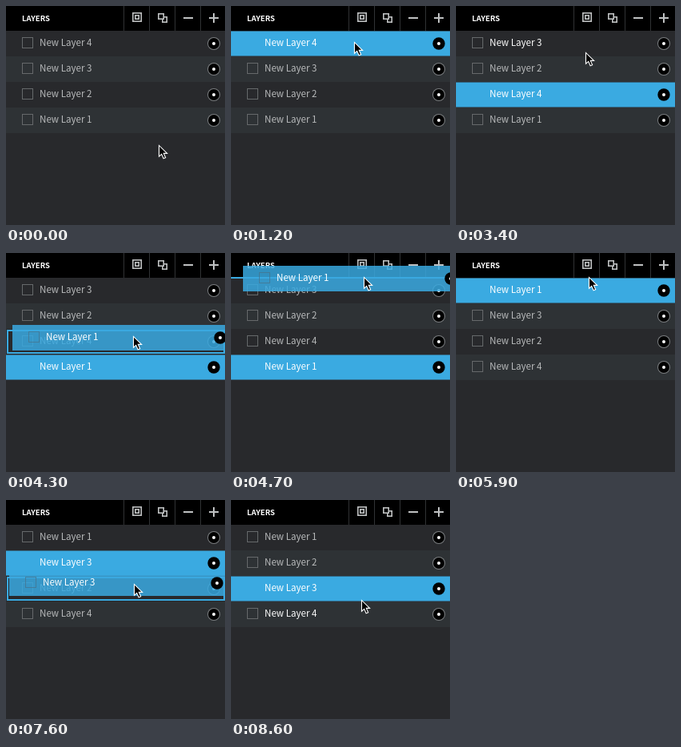
Animation, 274 px wide and 274 px high, one loop 9.2 s. Source, as an HTML page with a canvas:

```html
<!DOCTYPE html>
<html lang="en">
<head>
<meta charset="utf-8">
<title>Layer list reordering</title>
<style>
html, body { margin: 0; width: 274px; height: 274px; overflow: hidden; background: #28292c; }
canvas { display: block; }
</style>
</head>
<body>
<canvas id="stage" width="274" height="274"></canvas>
<script>
const LOOP = 9200, STEP = 100, SIZE = 274, TOP = 31, ROW = 32;
const BLUE = '#3aaae1', DARK = '#28292c', LIGHT = '#2e3235', GREY = '#bfc1c2';
const FONT = '"Noto Sans CJK JP", "Noto Sans CJK SC", "Noto Sans CJK", "Open Sans", sans-serif';
const ctx = document.getElementById('stage').getContext('2d');

// Pointer glides; bow bends the way up or down
const home = { x: 191, y: 174 };
const glides = [
  { from: 0, to: 600, x: 154, y: 45, bow: -25 },
  { from: 1200, to: 2100, x: 181, y: 122, bow: 15 },
  { from: 3000, to: 4000, x: 151, y: 141, bow: -75 },
  { from: 4100, to: 4700, x: 166, y: 30, bow: 0 },
  { from: 6400, to: 7000, x: 156, y: 80, bow: 0 },
  { from: 7300, to: 8200, x: 163, y: 125, bow: 12 }
];

// On drop the layer moves to the slot
const drags = [
  { press: 1200, drop: 2500, layer: '4', slot: 2 },
  { press: 4100, drop: 5800, layer: '1', slot: 0 },
  { press: 7300, drop: 8400, layer: '3', slot: 2 }
];

function pointerAt(t) {
  let { x, y } = home;
  for (const g of glides) {
    if (t <= g.from) break;
    const k = Math.min(1, (t - g.from) / (g.to - g.from));
    x += (g.x - x) * k * (2 - k);
    y += (g.y - y) * k + g.bow * Math.sin(Math.PI * k);
  }
  return { x: Math.round(x), y: Math.round(y) };
}

function orderAt(t) {
  let order = ['4', '3', '2', '1'];
  for (const d of drags) {
    if (t < d.drop) break;
    order = order.filter(layer => layer !== d.layer);
    order.splice(d.slot, 0, d.layer);
  }
  return order;
}

function rect(x, y, w, h, color) {
  ctx.fillStyle = color;
  ctx.fillRect(x, y, w, h);
}

function frame(x, y, w, h, color, line = 1) {
  ctx.strokeStyle = color;
  ctx.lineWidth = line;
  ctx.strokeRect(x + line / 2, y + line / 2, w - line, h - line);
}

function text(str, x, y, font, color) {
  ctx.font = font + ' ' + FONT;
  ctx.fillStyle = color;
  ctx.fillText(str, x, y);
}

function disc(x, y, r, color) {
  ctx.fillStyle = color;
  ctx.beginPath();
  ctx.arc(x, y, r, 0, Math.PI * 2);
  ctx.fill();
}

function eye(x, y, ringed) {
  if (ringed) disc(x, y, 8, '#7b7e80');
  disc(x, y, ringed ? 7 : 7.7, '#000');
  disc(x, y, 2, '#fff');
}

function label(layer, x, y, color) {
  text('New Layer ' + layer, x + 42, y + 19, '300 11.6px', color);
}

function row(layer, index, selected, hovered) {
  const y = TOP + index * ROW;
  rect(0, y, SIZE, ROW, index % 2 ? LIGHT : DARK);
  if (selected) rect(0, y + 0.5, SIZE, ROW - 1, BLUE);
  else frame(20, y + 8, 14, 14, '#66696b');
  label(layer, 0, y, selected || hovered ? '#fff' : '#b9bbbc');
  eye(260, y + 16, !selected);
}

function header() {
  rect(0, 0, SIZE, TOP, '#000');
  text('LAYERS', 20, 19, '700 9.5px', '#fff');
  for (let x = 147; x < SIZE; x += ROW) rect(x, 0, 1, TOP, '#303234');
  frame(158, 8, 12, 12, GREY, 1.6);
  frame(161, 11, 6, 6, GREY, 1.6);
  frame(195, 13, 7, 8, GREY, 1.6);
  rect(190, 9, 8, 8, '#000');
  frame(190, 9, 8, 8, GREY, 1.6);
  rect(222, 14, 12, 2, GREY);
  rect(254, 14, 12, 2, GREY);
  rect(259, 9, 2, 12, GREY);
}

// Line between rows near an edge, outline in the middle of a row
function dropMark(y) {
  const index = Math.max(0, Math.min(3, Math.floor((y - TOP) / ROW)));
  const top = TOP + index * ROW, rel = y - top;
  if (rel < 8) rect(0, top - 1, SIZE, 2, BLUE);
  else if (rel > 24) rect(0, top + ROW - 3, SIZE, 2, BLUE);
  else frame(1, top + 1, SIZE - 1, ROW - 2, BLUE, 2);
}

function ghost(layer, x, y) {
  ctx.globalAlpha = 0.85;
  rect(x, y, SIZE, ROW, BLUE);
  ctx.globalAlpha = 1;
  frame(x + 20, y + 8, 14, 14, 'rgba(70,115,140,.75)');
  label(layer, x, y, '#fff');
  eye(x + 260, y + 16, false);
}

const arrow = new Path2D('M.5 .5V15.5L4 12.3L6.6 18.3L9.4 17.1L6.8 11.3H11.5Z');

function cursor(p) {
  ctx.save();
  ctx.translate(p.x, p.y);
  ctx.scale(0.92, 0.92);
  ctx.fillStyle = '#000';
  ctx.strokeStyle = '#fff';
  ctx.lineWidth = 1.2;
  ctx.fill(arrow);
  ctx.stroke(arrow);
  ctx.restore();
}

function draw(t) {
  const p = pointerAt(t), hot = p.y + 3;
  const order = orderAt(t);
  const last = drags.filter(d => d.press <= t).pop();
  const held = last && t < last.drop;
  const over = held ? -1 : Math.floor((hot - TOP) / ROW);

  rect(0, 0, SIZE, SIZE, DARK);
  order.forEach((layer, i) => row(layer, i, last && last.layer === layer, i === over));
  header();
  if (held && t > last.press) {
    const grab = pointerAt(last.press);
    const top = TOP + order.indexOf(last.layer) * ROW;
    dropMark(hot);
    ghost(last.layer, p.x - grab.x, top + p.y - grab.y);
  }
  cursor(p);
}

const start = performance.now();
function tick() {
  const t = (performance.now() - start) % LOOP;
  draw(Math.floor(t / STEP) * STEP);
  requestAnimationFrame(tick);
}
tick();
</script>
</body>
</html>
```
